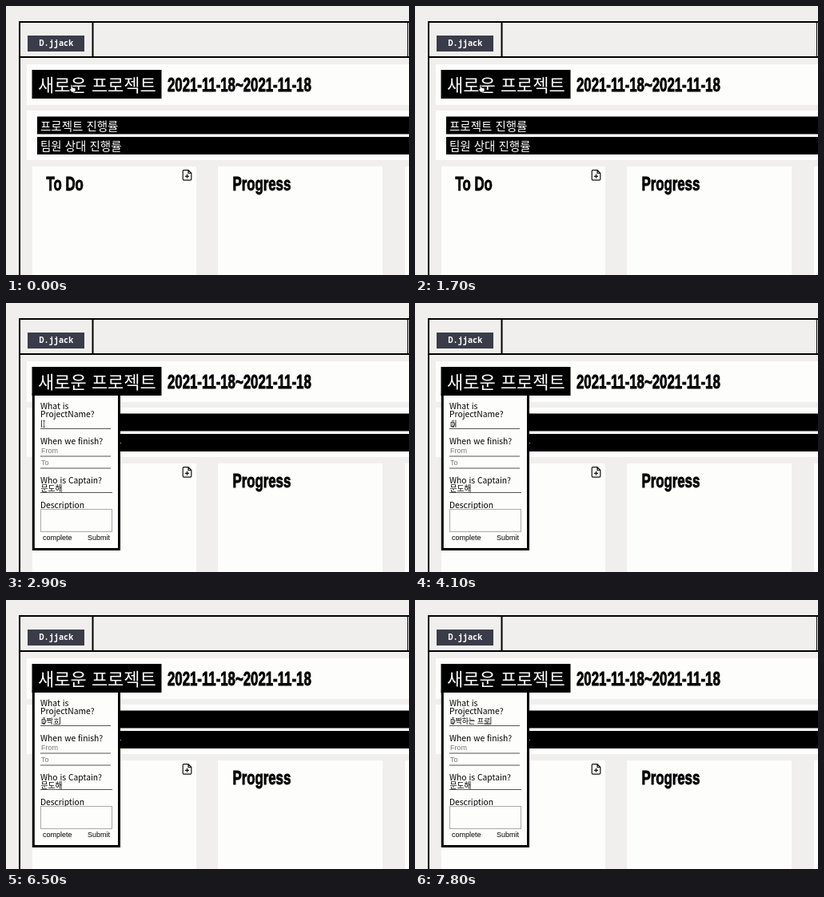
An HTML page that plays this animation: 504 px wide and 337 px high, repeating every 8 s.

```html
<!DOCTYPE html>
<html lang="ko">
<head>
<meta charset="utf-8">
<style>
  html, body { margin: 0; width: 100%; height: 100%; overflow: hidden; background: #f0efed; }
  svg { display: block; width: 504px; height: 337px; }
  text { font-family: "Noto Sans CJK KR", "Noto Sans CJK", sans-serif; white-space: pre; }
  .panel { fill: #fdfdfc; }
  .light { fill: #fff; }
  .label { font-size: 10.3px; }
  .ui text { font-family: "Liberation Sans", "Noto Sans CJK KR", "Noto Sans CJK", sans-serif; font-size: 9px; }
  .ui .hint { fill: #777; }
  .heavy text { font: bold 24px "Liberation Sans", sans-serif; stroke: #000; stroke-width: .9; }
  .rule { stroke: #555; fill: none; }
</style>
</head>
<body>
<svg viewBox="0 0 504 337">
  <path d="M17 337V20H504M17 64H504M108.500 20V64" fill="none" stroke="#000" stroke-width="2"/>
  <path d="M502.500 20V64" stroke="#000"/>
  <rect x="27" y="37" width="71" height="20" fill="#3a3d49"/>
  <text x="41.500" y="50.200" class="light" style="font:bold 10.2px 'Noto Sans Mono',monospace">D.jjack</text>

  <path class="panel" d="M26 73H504V124H26ZM26 131H504V193H26ZM33 201H238V337H33ZM265 201H471V337H265ZM499 201H504V337H499Z"/>
  <path d="M32.500 80H194.500V116H32.500ZM39 138.500H504V160.500H39ZM39 164H504V186H39Z"/>
  <text x="40" y="106.500" class="light" font-size="22">새로운 프로젝트</text>
  <text x="43" y="155.700" class="light" font-size="14.500">프로젝트 진행률</text>
  <text x="43" y="180.700" class="light" font-size="14.500">팀원 상대 진행률</text>
  <!-- condensed display face -->
  <g class="heavy">
    <text transform="translate(202 107) scale(.7 1)">2021-11-18~2021-11-18</text>
    <text transform="translate(50.500 231) scale(.7 1)">To Do</text>
    <text transform="translate(283.500 231) scale(.7 1)">Progress</text>
  </g>
  <path d="M228 205.700H222.500Q221.200 205.700 221.200 207V216.800Q221.200 218.200 222.500 218.200H230.500Q231.800 218.200 231.800 216.800V209.500ZM228 205.700V209.500H231.800M226.500 210.800V215.800M224 213.300H229" fill="none" stroke="#111" stroke-width="1.200"/>

  <g id="form">
    <rect x="34.300" y="114.500" width="107.200" height="194" fill="#fdfdfc" stroke="#000" stroke-width="3"/>
    <g class="label">
      <text x="43" y="133">What is</text>
      <text x="43" y="143">ProjectName?</text>
      <text x="43" y="177">When we finish?</text>
      <text x="43" y="226">Who is Captain?</text>
      <text x="43" y="257">Description</text>
    </g>
    <path class="rule" d="M43 157.500H131M43 192H131M43 207H131M43 237.500H133"/>
    <rect x="43.500" y="258.500" width="89" height="28" fill="#fdfdfc" stroke="#aaa"/>
    <text x="43.500" y="236.300" font-size="9.800">문도해</text>
    <g class="ui">
      <text x="44" y="188" class="hint">From</text>
      <text x="44" y="203" class="hint">To</text>
      <text x="46" y="297">complete</text>
      <text x="102" y="297">Submit</text>
      <text id="typed" x="44" y="154.500"></text>
    </g>
    <path id="compose" stroke="#333" stroke-width=".8"/>
    <path id="caret" stroke="#000" stroke-width=".8"/>
  </g>

  <path id="hand" d="M-1 0Q0-1 1 0V3L5 4V7L4 9H0L-3 5L-1 5Z" fill="#fff" stroke="#111" stroke-width=".8"/>
  <path id="arrow" d="M0 0V9L2 7L4 10L5 9L3.500 6.500H6Z" fill="#fff" stroke="#111" stroke-width=".8"/>
  <path id="beam" d="M-1.500-4H1.500M0-4V4M-1.500 4H1.500" fill="none" stroke="#444" stroke-width=".8"/>
</svg>
<script>
const LOOP = 8000, OPEN = 1800, FOCUS = 2900;
const el = id => document.getElementById(id);
const show = (node, on) => node.style.display = on ? "" : "none";
const [form, typed, compose, caret] = ["form", "typed", "compose", "caret"].map(el);
const cursors = ["hand", "arrow", "beam"].map(el);

// [time, text]: each syllable is composed letter by letter
const typing = [
  [0, ""], [4100, "D"], [5000, "Dㅉ"], [5200, "D짜"], [5500, "D짝"],
  [6500, "D짝ㅎ"], [6600, "D짝하"], [6800, "D짝한"], [6900, "D짝하느"],
  [7100, "D짝하는"], [7200, "D짝하는 "], [7400, "D짝하는 ㅍ"],
  [7500, "D짝하는 프"], [7600, "D짝하는 플"], [7800, "D짝하는 프로"]
];

function drawCursor(t) {
  const p = Math.min(1, Math.max(0, (t - 2000) / 600));
  const e = p * p * (3 - 2 * p);
  const x = 82 - 34.5 * e, y = 99 + 52.5 * e;
  const kind = y < 116 ? 0 : y < 146 ? 1 : 2;
  cursors.forEach((c, i) => {
    show(c, i === kind);
    c.setAttribute("transform", `translate(${x} ${y})`);
  });
}

function drawField(t) {
  const [since, text] = typing.filter(s => s[0] <= t).pop();
  if (typed.textContent !== text) typed.textContent = text;
  const end = text ? 44 + typed.getComputedTextLength() : 44;
  const composing = /[ㄱ-힣]$/.test(text);
  compose.setAttribute("d", composing ? `M${end - 8} 155.800H${end}` : "");
  caret.setAttribute("d", `M${end + .4} 146.500V156`);
  show(caret, t >= FOCUS && (t - Math.max(since, FOCUS)) % 1000 < 500);
}

function frame(now) {
  const t = Math.floor(now % LOOP / 100) * 100;
  show(form, t >= OPEN);
  if (t >= OPEN) drawField(t);
  drawCursor(t);
  requestAnimationFrame(frame);
}
frame(performance.now());
</script>
</body>
</html>
```
